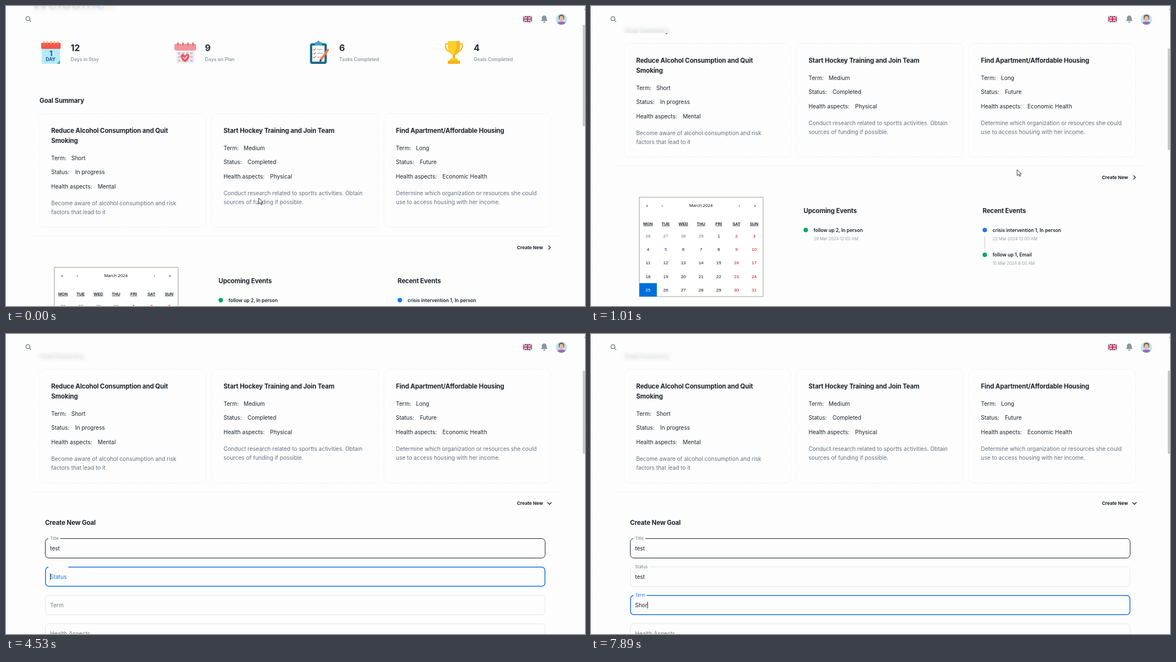
Write an HTML page that moves like this. It is 1038 px wide and 539 px high and loops after 8000 ms.

```html
<!DOCTYPE html>
<html lang="en">
<head>
<meta charset="utf-8">
<title>Goal dashboard</title>
<style>
html, body { margin: 0; width: 100%; height: 100%; overflow: hidden; background: #fdfdfd; }
#stage { position: relative; width: 1038px; height: 539px; overflow: hidden; }
svg { position: absolute; left: 0; top: 0; }
#bar { position: absolute; left: 3px; top: 0; width: 1031px; height: 49px; background: rgba(253,253,253,.82); backdrop-filter: blur(3px); }
text { font: 10px Inter, sans-serif; fill: #1c252e; }
.head { font-weight: 700; font-size: 11.4px; letter-spacing: -.14px; }
.num { font-weight: 700; font-size: 15.5px; }
.label { font-weight: 600; font-size: 8.5px; fill: #919eab; }
.desc { font-size: 10px; fill: #637381; }
.event { font-weight: 600; font-size: 8.5px; }
.date { font-size: 7.4px; fill: #919eab; }
.btn { font-weight: 700; font-size: 8.2px; }
.nav { font: 7.7px "Open Sans", sans-serif; fill: #000; text-anchor: middle; }
.day { font: 8px "Liberation Sans", Arial, sans-serif; text-anchor: middle; }
.week { font: bold 7.3px "Liberation Sans", Arial, sans-serif; text-anchor: middle; text-decoration: underline dotted; }
.hint { font: 8.7px "Noto Sans", sans-serif; }
.dash { fill: none; stroke: #e9ecee; stroke-dasharray: 2 2; }
</style>
</head>
<body>
<div id="stage">
  <svg width="1038" height="539">
    <path class="dash" d="M2.5 0V539"/>
    <g id="page"></g>
    <g id="form"></g>
  </svg>
  <div id="bar"></div>
  <svg id="top" width="1038" height="539" fill="none">
    <g stroke="#637381" stroke-width="1.3"><circle cx="39.3" cy="22.8" r="3.6"/><path d="M42 25.6L45 28.6"/></g>
    <g transform="translate(927 18)">
      <path fill="#1f3b8c" d="M0 0H16V11H0Z"/>
      <path stroke="#fff" stroke-width="2.2" d="M0 0L16 11M16 0L0 11"/>
      <path stroke="#d3233c" stroke-width=".8" d="M0 0L16 11M16 0L0 11"/>
      <path stroke="#fff" stroke-width="3.6" d="M8 0V11M0 5.500H16"/>
      <path stroke="#d3233c" stroke-width="2" d="M8 0V11M0 5.500H16"/>
    </g>
    <path fill="#8b96a1" d="M965 17C961.500 17 960.800 20 960.800 22.500C960.800 25 959.500 25.500 959.500 27H970.500C970.500 25.500 969.200 25 969.200 22.500C969.200 20 968.500 17 965 17ZM963 28H967A2 2 0 0 1 963 28Z"/>
    <circle cx="995.700" cy="23.700" r="10" fill="#b9e3ee"/>
    <path fill="#9a6fae" d="M988.500 30.500C989 27 1002.500 27 1003 30.500A10 10 0 0 1 988.500 30.500Z"/>
    <path fill="#7b4a3c" d="M991 24V19C991 14.500 1000.500 14.500 1000.500 19V24Z"/>
    <ellipse cx="995.700" cy="22.500" rx="3.700" ry="4.800" fill="#e8b6a4"/>
    <path fill="#a0a0a0" d="M1038 4L1036 7H1038Z"/>
    <rect id="thumb" x="1034" width="4" fill="#c8c8c8"/>
    <g id="arrow" fill="#fff" stroke="#222" stroke-width=".9"><path d="M0 0V10.800L2.500 8.600 4.200 12.200 5.900 11.400 4.300 8H7.500Z"/></g>
    <g id="hand" fill="#fff" stroke="#222" stroke-width=".9"><path d="M-1.300 7V1C-1.300-.4 .9-.4 .9 1V5C2 4.400 3 4.600 3.200 5.400 4 4.900 5 5.200 5.200 6 6 5.700 6.600 6.200 6.600 7V9.500C6.600 11.500 5.500 12 5.500 14H-.5C-.5 12.500-3.800 9.800-4.200 8.300-4.200 7-2.600 6.500-1.300 8Z"/></g>
    <g id="beam" stroke="#222" stroke-width=".9"><path d="M-2.500-5H-.6L0-4.500 .6-5H2.500M0-4.500V4.500M-2.500 5H-.6L0 4.500 .6 5H2.500"/></g>
  </svg>
</div>
<script>
const $ = id => document.getElementById(id);
const text = (x, y, str, cls = '', extra = '') =>
  `<text x="${x}" y="${y}" dy=".364em" class="${cls}" ${extra}>${str}</text>`;
const rect = (x, y, w, h, fill, rx = 0) =>
  `<rect x="${x}" y="${y}" width="${w}" height="${h}" rx="${rx}" fill="${fill}"/>`;
const dot = (x, y, r, fill) => `<circle cx="${x}" cy="${y}" r="${r}" fill="${fill}"/>`;
const line = (d, stroke, width) =>
  `<path d="${d}" fill="none" stroke="${stroke}" stroke-width="${width}" stroke-linecap="round" stroke-linejoin="round"/>`;
const shape = (d, fill) => `<path d="${d}" fill="${fill}"/>`;
const range = n => [...Array(n).keys()];

const icons = [
  rect(64, 68, 33, 36, '#b5ecfb', 3) + rect(63, 66, 35, 11, '#f0574f', 2) +
    range(5).map(i => rect(67 + i * 6.3, 63, 2, 6, '#f5a25b', 1)).join('') +
    shape('M91 104L97 97V104Z', '#4fa9dc') +
    text(80.5, 85, '1', 'num', 'text-anchor="middle" style="fill:#2b4c9b;font-size:13px"') +
    text(80, 96, 'DAY', 'head', 'text-anchor="middle" style="fill:#2b4c9b;font-size:8.5px"'),

  rect(305, 74, 33, 29, '#f1eef2', 2) + rect(302, 68, 39, 12, '#f4949b', 3) +
    [308, 317, 326, 335].map(x => rect(x - 1, 65.5, 2.5, 6, '#d9707c', 1)).join('') +
    range(12).map(i => rect(308 + i % 4 * 7.4, 83 + (i >> 2) * 6.5, 4.5, 4, '#cfc6d2')).join('') +
    shape('M321 101C309 93 313 85 318 86.500Q320 87 321 89Q322 87 324 86.500C329 85 333 93 321 101Z', '#f0576b') +
    line('M318 92.500L320.500 95L324.500 90.500', '#fff', 1.5),

  rect(545, 67, 30, 37, '#176b8e', 4) + rect(549, 71, 22, 29, '#fff', 1) + rect(553, 65, 14, 6, '#43a6c6', 2) +
    dot(560, 65, 2.5, '#43a6c6') +
    range(3).map(i => line(`M551 ${78 + i * 7}l1.500 1.500 2.500 -3`, '#f0713a', 1.2) +
      line(`M558 ${78 + i * 7}h9`, '#77848f', 1.2)).join('') +
    line('M577 79L565 96', '#f47b45', 4) + shape('M562.500 95L567 98L562 101Z', '#34495e'),

  line('M793 68H788C787 77 792 82 796 83M813 68H818C819 77 814 82 810 83', '#f7b718', 2.2) +
    shape('M792 63H814V73C814 82 809 88 803 88S792 82 792 73Z', '#ffd02e') +
    shape('M807 63H814V73C814 82 809 88 803 88Q808 79 807 63Z', '#f9b91c') +
    rect(801, 87, 4, 9, '#f3ad16') + shape('M797 94H809L811 99H795Z', '#ffcb27') +
    rect(792, 98, 22, 6, '#f6b51b', 1)
];
const stats = [[12, 'Days in Stay'], [9, 'Days on Plan'], [6, 'Tasks Completed'], [4, 'Goals Completed']];
const cards = [
  [['Reduce Alcohol Consumption and Quit', 'Smoking'], ['Short', 'In progress', 'Mental'],
    ['Become aware of alcohol consumption and risk', 'factors that lead to it']],
  [['Start Hockey Training and Join Team'], ['Medium', 'Completed', 'Physical'],
    ['Conduct research related to sportts activities. Obtain', 'sources of funding if possible.']],
  [['Find Apartment/Affordable Housing'], ['Long', 'Future', 'Economic Health'],
    ['Determine which organization or resources she could', 'use to access housing with her income.']]
];
const keys = [['Term:', 36], ['Status:', 43], ['Health aspects:', 83.5]];

function card([title, values, desc], i) {
  const x = 81 + i * 309, shift = 18 * (title.length - 1);
  return `<rect class="dash" x="${x - 21.5}" y="193.5" width="299" height="204" rx="9"/>` +
    title.map((s, j) => text(x, 223.5 + 18 * j, s, 'head')).join('') +
    keys.map(([key, dx], j) => {
      const y = 255 + shift + 25.5 * j;
      return text(x, y, key) + text(x + dx, y, values[j]);
    }).join('') +
    desc.map((s, j) => text(x, 336.8 + shift + 15.2 * j, s, 'desc')).join('');
}

function calendar() {
  const col = c => 102.2 + 31.7 * c;
  const days = range(35).map(i => {
    const color = i === 28 ? '#fff' : i < 4 ? '#757575' : i % 7 > 4 ? '#d10000' : i === 8 ? '#1a1aee' : '#111';
    return text(col(i % 7), 539 + 24.2 * Math.floor(i / 7), i < 4 ? 26 + i : i - 3, 'day', `style="fill:${color}"`);
  }).join('');
  return '<rect x="86.5" y="469.500" width="222" height="178.500" fill="#fff" stroke="#a0a096"/>' +
    rect(87, 624, 31, 24, '#006edc') +
    [[100.5, '«'], [128, '‹'], [197, 'March 2024'], [266, '›'], [294, '»']].map(([x, s]) => text(x, 484, s, 'nav')).join('') +
    ['MON', 'TUE', 'WED', 'THU', 'FRI', 'SAT', 'SUN'].map((s, c) => text(col(c), 517, s, 'week')).join('') + days;
}

const event = (x, y, color, title, date) =>
  dot(x, y, 4, color) + text(x + 14, y, title, 'event') + text(x + 14, y + 15.5, date, 'date');

$('page').innerHTML =
  text(46, -5, 'Welcome', 'num', 'style="font-size:29px"') + dot(187, -2, 9, '#f5c08a') +
  stats.map(([n, s], i) => icons[i] + text(116 + 240.8 * i, 75, n, 'num') + text(116 + 240.8 * i, 96, s, 'label')).join('') +
  text(60, 169.500, 'Goal Summary', 'head') + cards.map(card).join('') +
  '<path class="dash" d="M46 413.500H992"/>' +
  '<g id="hover">' + rect(913, 424, 69, 19, '#ececed', 5) + '<circle id="ripple" cx="927.500" cy="433" fill="#919eab" opacity=".35"/></g>' +
  text(916, 434, 'Create New', 'btn') + '<path id="chevron" fill="none" stroke="#1c252e" stroke-width="1.3"/>' +
  '<g id="agenda">' + calendar() +
  text(381, 493.500, 'Upcoming Events', 'head') + text(702, 493.500, 'Recent Events', 'head') +
  event(385, 528.500, '#06a66c', 'follow up 2, In person', '29 Mar 2024 12:00 AM') +
  event(706, 528.500, '#1877f2', 'crisis intervention 1, In person', '22 Mar 2024 12:00 AM') +
  event(706, 573, '#06a66c', 'follow up 1, Email', '15 Mar 2024 8:00 AM') +
  rect(705.500, 540, 1, 22, '#bcc5ce') + '</g>';

// Form fields: focus span and key press times
const fields = [
  { name: 'Title', focus: [2700, 4530], typed: 'test', press: [3840, 3990, 4110, 4260] },
  { name: 'Status', focus: [4530, 6210], typed: 'test', press: [5290, 5290, 5940, 6090] },
  { name: 'Term', focus: [6210, 8000], typed: 'Short', press: [7500, 7500, 7750, 7890] },
  { name: 'Health Aspects', focus: [9e9, 9e9], typed: '', press: [] }
];
const caretOff = [[3280, 3840], [5140, 5290], [5690, 5940], [6850, 7500]];
const within = (t, [a, b]) => t >= a && t < b;
const clamp = v => Math.min(1, Math.max(0, v));
const fieldTop = i => 367 + 51 * i;

$('form').innerHTML = text(70, 338.500, 'Create New Goal', 'head') + fields.map((f, i) => {
  const y = fieldTop(i);
  return `<rect id="box${i}" rx="6" fill="none"/>` +
    `<rect id="gap${i}" x="76" y="${y - 1}" height="4" fill="#fdfdfd"/>` +
    text(79, y + 18.5, f.name, '', `id="name${i}"`) + text(79, y + 18.5, '', '', `id="value${i}"`) +
    `<rect id="caret${i}" y="${y + 12}" width="1" height="12" fill="#1c252e"/>`;
}).join('') + fields.slice(0, 2).map((f, i) => {
  const y = fieldTop(i) + 35.5;
  return `<g id="list${i}"><rect x="69.5" y="${y}" width="897" height="17" rx="1" fill="#fff" stroke="#a8a8a8"/>` +
    text(74, y + 8.500, 'test', 'hint') + '</g>';
}).join('');

const show = (id, on) => $(id).style.display = on ? '' : 'none';
const set = (id, attrs) => { for (const k in attrs) $(id).setAttribute(k, attrs[k]); };

function drawField(f, i, t) {
  const y = fieldTop(i), active = within(t, f.focus);
  const value = f.typed.slice(0, f.press.filter(p => t >= p).length);
  const up = clamp((t - f.focus[0]) / 200), lift = 1 - (1 - up) ** 2;
  const hovered = i === 0 && t >= 2450;
  const border = active ? 1.5 : 1;
  set('box' + i, {
    x: 70 + border / 2, y: y + border / 2, width: 897 - border, height: 36 - border,
    stroke: active ? '#1a73e0' : hovered ? '#1c252e' : '#e3e7ea', 'stroke-width': border
  });
  set('name' + i, { y: y + 18.5 - 18.3 * lift });
  $('name' + i).style.cssText = `font-size:${10 - 2.5 * lift}px;fill:${active ? '#1a73e0' : '#707d89'}`;
  $('value' + i).textContent = value;
  set('gap' + i, { width: up && $('name' + i).getComputedTextLength() + 6 });
  set('caret' + i, { x: 79 + (value ? $('value' + i).getComputedTextLength() : 0) });
  show('caret' + i, active && !caretOff.some(span => within(t, span)));
  if (i < 2) show('list' + i, active && value);
}

// Pointer path: time, x, y
const path = [
  [0, 453, 345], [752, 685, 301], [1008, 764, 294], [1264, 854, 303], [1520, 951, 314], [1648, 921, 306],
  [1904, 921, 306], [2160, 495, 327], [2416, 390, 372], [2544, 372, 382], [8000, 372, 382]
];
function pointer(t) {
  const i = path.findIndex(p => p[0] > t), a = path[i - 1], b = path[i];
  const k = (t - a[0]) / (b[0] - a[0]);
  return [a[1] + (b[1] - a[1]) * k, a[2] + (b[2] - a[2]) * k];
}
const notch = (t, start) => 65 * (1 - (1 - clamp((t - start) / 496)) ** 4);

function draw(t) {
  // Motion advances in ticks of 128 ms
  const tick = Math.max(0, Math.floor((t + 16) / 128) * 128 - 16);
  const scroll = Math.round(notch(tick, 80) + notch(tick, 752));
  const open = t >= 1910;
  set('page', { transform: `translate(0 ${-scroll})` });
  set('thumb', open ? { y: 66, height: 149 } : { y: 34 + .338 * scroll, height: 182 });
  set('chevron', { d: open ? 'M970.500 432.500L974.300 436L978 432.500' : 'M972.500 430.500L976 434L972.500 437.500' });
  show('agenda', !open);
  show('form', open);

  const hand = within(t, [1640, 2040]), beam = t >= 2400;
  show('hover', hand);
  set('ripple', { r: t >= 1776 ? 6 * clamp((2040 - t) / 120) : 0 });
  const [x, y] = pointer(tick);
  show('hand', hand);
  show('beam', beam && t < 3840);
  show('arrow', !hand && !beam);
  for (const id of ['hand', 'beam', 'arrow']) set(id, { transform: `translate(${x} ${y})` });

  if (open) fields.forEach((f, i) => drawField(f, i, t));
}

const start = performance.now();
function loop() {
  draw((performance.now() - start) % 8000);
  requestAnimationFrame(loop);
}
loop();
</script>
</body>
</html>
```
